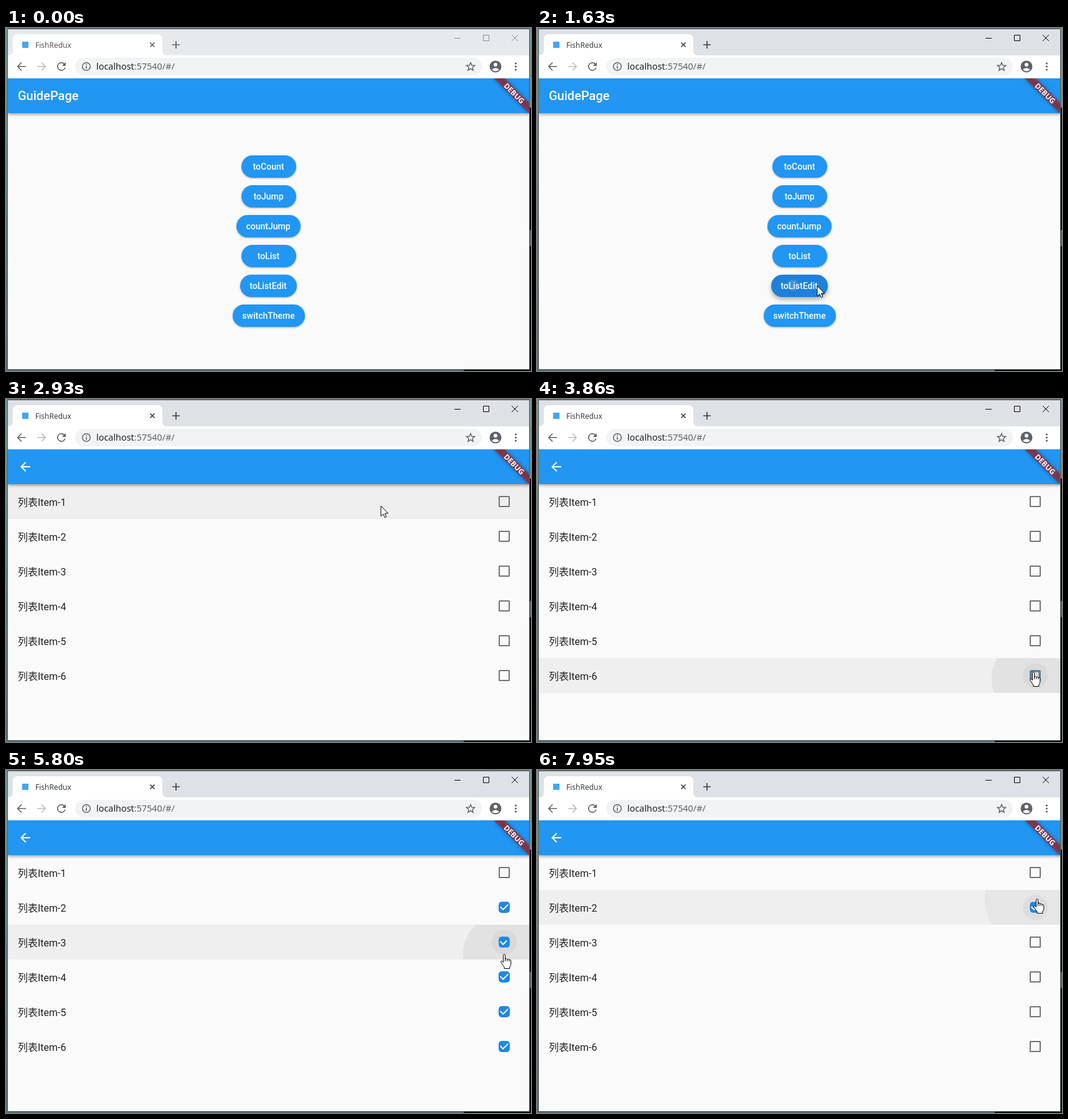
Write an HTML page that moves like this. It is 843x552 px and loops after 8 s.

```html
<!DOCTYPE html>
<html lang="en">
<head>
<meta charset="utf-8">
<title>FishRedux</title>
<style>
  html, body { margin: 0; width: 100%; height: 100%; overflow: hidden; background: #5d7f80; }
  svg { display: block; }
  text { font-family: Roboto, "Noto Sans CJK SC", "Noto Sans CJK", sans-serif; white-space: pre; }
  .ui { font-family: "Noto Sans", "Open Sans", sans-serif; }
  .bar { fill: #2196f3; filter: drop-shadow(0 2px 2.5px rgba(0, 0, 0, .38)); }
  .line { fill: none; stroke: #5f6368; stroke-width: 1.7; }
  .button text { font-size: 14px; font-weight: 500; fill: #fff; text-anchor: middle; }
</style>
</head>
<body>
<svg id="stage" width="843" height="552" viewBox="0 0 843 552">
  <defs>
    <linearGradient id="desk" x2="0" y2="1">
      <stop offset="0" stop-color="#6f9c94"/><stop offset=".45" stop-color="#5f8583"/>
      <stop offset="1" stop-color="#566c70"/>
    </linearGradient>
    <clipPath id="view"><rect x="3" y="81" width="837" height="468"/></clipPath>
    <clipPath id="pressArea"><rect x="376" y="397" width="91" height="36" rx="18"/></clipPath>
  </defs>

  <!-- desktop and window frame -->
  <rect width="843" height="552" fill="url(#desk)"/>
  <path d="M841 128h2v424h-2zM735 550h108v2H735z" fill="#0b0f10"/>
  <path d="M841 325h2v26h-2z" fill="#5c6668"/>
  <rect x="2" y="0.5" width="839" height="549.5" fill="#4b5a5c"/>
  <rect id="frame" x="3" y="2" width="837" height="547"/>

  <!-- tab strip -->
  <path d="M3 44Q11 44 11 36V18Q11 10 19 10H243Q251 10 251 18V36Q251 44 259 44H840V81H3Z" fill="#fff"/>
  <rect x="26" y="22" width="10" height="10" fill="#42a5f5"/>
  <text class="ui" id="tabTitle" x="47" y="32" font-size="12">FishRedux</text>
  <path id="tabIcons" d="M231.5 23.5l7 7m0-7l-7 7M267 27h12m-6-6v12" fill="none" stroke-width="1.7"/>
  <path id="winIcons" d="M720 16.5h10M766.500 11.500h9v9h-9zM812 11l10 10m0-10l-10 10" fill="none"/>

  <!-- toolbar -->
  <path class="line" d="M32 62H19M25 55.500L18.800 62 25 68.500"/>
  <path class="line" d="M50 62h13M57 55.500L63.200 62 57 68.500" style="stroke:#babcbe"/>
  <path transform="translate(78.500 51.500) scale(.87)" fill="#5f6368"
    d="M17.650 6.350A8 8 0 1 0 19.730 14h-2.080A6 6 0 1 1 12 6c1.660 0 3.140.690 4.220 1.780L13 11h7V4z"/>
  <rect x="111" y="48" width="653" height="28" rx="14" fill="#f1f3f4"/>
  <circle class="line" cx="129" cy="62" r="6.300" style="stroke-width:1.500"/>
  <path d="M128.200 58h1.600v1.600h-1.600zM128.200 61h1.600v4.500h-1.600z" fill="#5f6368"/>
  <text class="ui" x="145" y="67" font-size="14.4" fill="#202124">localhost<tspan fill="#5f6368">:57540/#/</tspan></text>
  <path id="star" class="line" style="stroke-width:1.400"/>
  <circle cx="786" cy="62" r="9.500" fill="#5f6368"/>
  <circle cx="786" cy="59" r="3" fill="#fff"/>
  <path d="M780 67Q786 61.500 792 67Q786 72 780 67Z" fill="#fff"/>
  <path d="M818.500 57v.01M818.500 62v.01M818.500 67v.01" stroke="#5f6368" stroke-width="3.200" stroke-linecap="round"/>

  <g clip-path="url(#view)">
    <rect x="3" y="81" width="837" height="468" fill="#fafafa"/>
    <rect class="bar" x="3" y="81" width="837" height="56"/>
    <text x="19" y="116" font-size="20" font-weight="500" fill="#fff">GuidePage</text>
    <g id="buttons"></g>
    <circle id="press" cx="411" cy="414" clip-path="url(#pressArea)" fill="#c8c8c8"/>

    <g id="listPage">
      <rect x="3" y="81" width="837" height="468" fill="#fafafa"/>
      <g id="rows"></g>
      <rect class="bar" x="3" y="81" width="837" height="56"/>
      <path transform="translate(19 97)" fill="#fff"
        d="M20 11H7.830l5.590-5.590L12 4l-8 8 8 8 1.410-1.410L7.830 13H20z"/>
    </g>

    <g transform="translate(840 81) rotate(45)">
      <rect x="-40" y="28" width="80" height="12" fill="#b71c1c" fill-opacity=".63"
        style="filter:drop-shadow(0 0 3px rgba(0,0,0,.6))"/>
      <text x="0" y="38.300" font-size="11.8" font-weight="700" fill="#fff" text-anchor="middle"
        style="font-family:'Open Sans','Noto Sans',sans-serif">DEBUG</text>
    </g>
  </g>

  <circle id="flash" r="12" fill="#ff0" fill-opacity=".55"/>
  <g id="cursor" fill="#fff" stroke="#000" stroke-linejoin="round">
    <path id="arrow" d="M0 0V16.500L3.800 13 6.300 18.600 8.800 17.500 6.400 12H11.500Z"/>
    <path id="hand" d="M-1.500 1.500Q0-1 1.500 1.500V8Q4 6.500 4.600 8.600Q7 7.400 7.800 9.400Q10.600 8.800 10.800 11V16
      Q10.500 19 8.800 21V23.500H0V21Q-1.500 19-5.300 13.500Q-5.800 11-3.500 11.500L-1.500 13.500Z
      M1.500 8V12M4.600 8.600V12M7.800 9.400V12"/>
  </g>
</svg>
<script>
const LOOP = 8000, ROW = 56, TOP = 137;
const $ = id => document.getElementById(id);
const set = (node, attrs) => { for (const k in attrs) node.setAttribute(k, attrs[k]); };
const clamp = v => Math.max(0, Math.min(1, v));
const smooth = u => u * u * (3 - 2 * u);

// pointer path: time, x, y
const path = [
  [150, 840, 86], [300, 760, 260], [500, 610, 518], [680, 495, 488], [920, 408, 416],
  [990, 411, 414], [1480, 411, 414], [1620, 450, 415], [2150, 450, 415], [2500, 530, 290],
  [2930, 602, 172], [3230, 790, 400], [3400, 800, 474], [3540, 796, 450], [3780, 796, 450],
  [4060, 799, 395], [4250, 799, 395], [4390, 799, 340], [4500, 799, 340], [4630, 800, 291],
  [4800, 800, 291], [5010, 799, 232], [5400, 799, 232], [5640, 800, 296], [5850, 800, 296],
  [6000, 799, 340], [6200, 799, 340], [6400, 800, 402], [6620, 800, 402], [6980, 801, 434],
  [7180, 801, 434], [7480, 800, 310], [7720, 803, 207]
];
// clicks on list rows: time, row
const clicks = [[3710, 5], [4090, 4], [4395, 3], [4750, 2], [5110, 1],
                [5650, 2], [6050, 3], [6440, 4], [7070, 5], [7782, 1]];
const ACTIVATE = 1310, RIPPLE_LAG = 85, TOGGLE_LAG = 135;

function pointer(t) {
  const i = path.findIndex(p => p[0] > t);
  if (i < 0) return path[path.length - 1].slice(1);
  if (i === 0) return path[0].slice(1);
  const [t0, x0, y0] = path[i - 1], [t1, x1, y1] = path[i];
  const u = smooth((t - t0) / (t1 - t0));
  return [x0 + (x1 - x0) * u, y0 + (y1 - y0) * u];
}

// share of the last moments in which the pointer passed the test
function hover(t, test) {
  let hits = 0;
  for (let k = 0; k < 6; k++) if (test(...pointer(t - 16 * k))) hits++;
  return hits / 6;
}

const buttons = [['toCount', 378, 88], ['toJump', 378, 88], ['countJump', 370, 103],
  ['toList', 378, 88], ['toListEdit', 376, 91], ['switchTheme', 364, 116]
].map(([name, x, w], i) => ({ name, x, w, y: 205 + 48 * i }));

$('buttons').innerHTML = buttons.map(b => `<g class="button">
  <rect x="${b.x}" y="${b.y}" width="${b.w}" height="36" rx="18"/>
  <text x="${b.x + b.w / 2 - .5}" y="${b.y + 23}">${b.name}</text></g>`).join('');

$('rows').innerHTML = [...Array(6).keys()].map(i => `
  <svg x="3" y="${TOP + ROW * i}" width="837" height="${ROW}">
    <rect class="shade" width="837" height="${ROW}"/>
    <circle class="ripple" fill="#c8c8c8"/>
    <circle class="halo" cx="797" cy="28" r="20"/>
    <text x="16" y="35" font-size="16" fill="#212121">列表Item-${i + 1}</text>
    <rect class="box" rx=".5"/>
    <polyline class="tick" points="790.7,27.1 795.2,31.6 803.3,23.5" pathLength="1"
      fill="none" stroke="#fff" stroke-width="2"/>
  </svg>`).join('');

const buttonRects = [...document.querySelectorAll('.button rect')];
const rows = [...document.querySelectorAll('#rows svg')].map(svg =>
  Object.fromEntries(['shade', 'ripple', 'halo', 'box', 'tick'].map(c => [c, svg.querySelector('.' + c)])));

set($('star'), { d: 'M' + [...Array(10).keys()].map(k => {
  const r = k % 2 ? 3.100 : 7, a = k * Math.PI / 5;
  return `${(746 + r * Math.sin(a)).toFixed(2)} ${(62.5 - r * Math.cos(a)).toFixed(2)}`;
}).join('L') + 'Z' });

const overBox = (x, y, i) => Math.abs(x - 800) < 24 && Math.abs(y - TOP - 28 - ROW * i) < 22;

function checkValue(t, row) {
  let value = 0, on = false;
  for (const [at, r] of clicks) {
    if (r !== row) continue;
    on = !on;
    const p = clamp((t - at - TOGGLE_LAG) / 200);
    if (p > 0) value = on ? p : 1 - p;
  }
  return value;
}

function drawBox({ box, tick }, v) {
  const size = 16 + 4 * Math.abs(v - .5);
  const edge = Math.min(size / 2, 2 + size * v);
  const k = Math.min(1, 4 * v), colour = `rgb(${117 - 87 * k},${117 + 19 * k},${117 + 112 * k})`;
  set(box, {
    x: 797 - (size - edge) / 2, y: 28 - (size - edge) / 2, width: size - edge, height: size - edge,
    stroke: colour, 'stroke-width': edge, fill: v >= .5 ? colour : 'none'
  });
  set(tick, { 'stroke-dasharray': `${clamp(2 * v - 1)} 2`, opacity: v > .5 ? 1 : 0 });
}

function drawRow(t, i) {
  const row = rows[i], value = checkValue(t, i);
  const shade = hover(t, (x, y) => Math.floor((y - TOP) / ROW) === i);
  const halo = hover(t, (x, y) => overBox(x, y, i));
  set(row.shade, { 'fill-opacity': .044 * shade });
  set(row.halo, value ? { fill: '#000', 'fill-opacity': .04 * halo }
                      : { fill: '#1e88e5', 'fill-opacity': .12 * halo });
  const click = clicks.filter(c => c[1] === i && c[0] + RIPPLE_LAG <= t).pop();
  if (click) {
    const [x, y] = pointer(click[0]), age = t - click[0] - RIPPLE_LAG;
    set(row.ripple, { cx: x - 3, cy: y - TOP - ROW * i, r: age, opacity: .4 * clamp((125 - age) / 70) });
  } else set(row.ripple, { r: 0 });
  drawBox(row, value);
}

function drawFrame(t) {
  const active = t >= ACTIVATE;
  set($('frame'), { fill: active ? '#dee1e6' : '#e7eaed' });
  set($('tabTitle'), { fill: active ? '#3c4043' : '#54585c' });
  set($('tabIcons'), { stroke: active ? '#3c4043' : '#5f6368' });
  set($('winIcons'), { stroke: active ? '#000' : '#8c8f92' });
}

function drawButtons(t) {
  buttons.forEach(({ x, y, w }, i) => {
    const h = hover(t, (px, py) => px >= x && px <= x + w && py >= y && py <= y + 36);
    set(buttonRects[i], { fill: `rgb(${33 - 3 * h},${150 - 22 * h},${243 - 24 * h})` });
    buttonRects[i].style.filter = `drop-shadow(0 ${1.5 + 2.5 * h}px ${1.5 + 2 * h}px rgba(0,0,0,.3))`;
  });
  const age = t - 1622;
  set($('press'), { r: Math.max(0, age), opacity: .25 * clamp((200 - age) / 100) });
}

function drawPointer(t) {
  const [x, y] = pointer(t);
  const onBox = t > 2400 && rows.some((_, i) => overBox(x, y, i));
  set($('cursor'), { transform: `translate(${Math.round(x)} ${Math.round(y)})`, opacity: t < 150 ? 0 : 1 });
  set($('hand'), { opacity: onBox ? 1 : 0 });
  set($('arrow'), { opacity: onBox ? 0 : 1 });
  const pressed = [ACTIVATE, ...clicks.map(c => c[0])].some(at => t >= at && t < at + 100);
  set($('flash'), { cx: x, cy: y, opacity: pressed ? 1 : 0 });
}

function draw() {
  const t = performance.now() % LOOP;
  const p = clamp((t - 1710) / 300);
  drawFrame(t);
  drawButtons(t);
  set($('listPage'), { opacity: p * p, transform: `translate(0 ${117 * (1 - p) ** 3})` });
  rows.forEach((_, i) => drawRow(t, i));
  drawPointer(t);
  requestAnimationFrame(draw);
}
draw();
</script>
</body>
</html>
```
